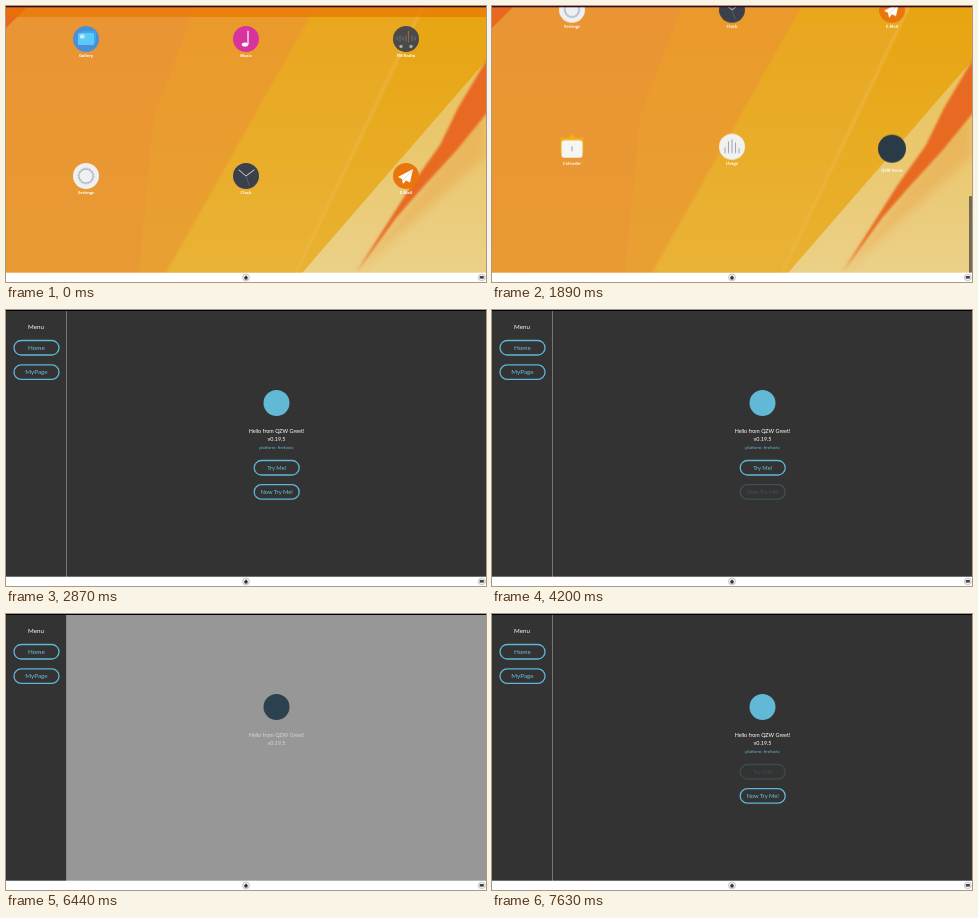
These frames come from a looping animation (480x276 px, 8 s). An HTML page:

```html
<!DOCTYPE html>
<html lang="en">
<head>
<meta charset="utf-8">
<title>TV launcher</title>
<style>
  html, body { margin: 0; width: 100%; height: 100%; overflow: hidden; background: #fff; }
  svg { display: block; width: 100vw; height: 100vh; }
  text { text-anchor: middle; font-family: Lato, sans-serif; }
  .label { font: bold 4px "Open Sans", sans-serif; fill: #fff; }
  .button rect { fill: none; stroke: #5fb6d5; stroke-width: 1.3; }
  .button text { fill: #69c3e0; font-size: 6.3px; }
  #dark .button text { font-size: 5.8px; }
  .line { fill: none; stroke-linecap: round; }
</style>
</head>
<body>
<svg viewBox="0 0 480 276">
  <defs>
    <clipPath id="screen"><rect width="480" height="267"/></clipPath>
    <filter id="soft" x="-20%" y="-20%" width="140%" height="140%"><feGaussianBlur stdDeviation="1"/></filter>
    <filter id="softer" x="-20%" y="-20%" width="140%" height="140%"><feGaussianBlur stdDeviation="5"/></filter>
    <linearGradient id="left" x1="0" y1="0" x2="0" y2="1">
      <stop offset="0" stop-color="#ea9433"/><stop offset="1" stop-color="#e99a34"/>
    </linearGradient>
    <linearGradient id="middle" x1="0" y1="0" x2="0" y2="1">
      <stop offset="0" stop-color="#ea9a2a"/><stop offset="1" stop-color="#e9a032"/>
    </linearGradient>
    <linearGradient id="gold" x1="0" y1="0" x2="0" y2="1">
      <stop offset="0" stop-color="#e9a61e"/><stop offset="1" stop-color="#e9b336"/>
    </linearGradient>
    <linearGradient id="right" x1="0" y1="0" x2="0" y2="1">
      <stop offset="0" stop-color="#e8a411"/><stop offset="1" stop-color="#e9b232"/>
    </linearGradient>
    <linearGradient id="pale" x1="0" y1="0" x2="0" y2="1">
      <stop offset="0" stop-color="#e9c25c"/><stop offset="1" stop-color="#ebd088"/>
    </linearGradient>
  </defs>

  <g clip-path="url(#screen)">
    <g id="wallpaper">
      <rect width="480" height="267" fill="url(#left)"/>
      <path d="M190 0H345L160 267H133L148 110Z" fill="url(#middle)"/>
      <path d="M310 0H480V267H160Z" fill="url(#gold)" filter="url(#soft)"/>
      <path d="M418 0H480V267H290Z" fill="url(#right)"/>
      <path d="M417 0L290 267" stroke="#ecb94a" stroke-width="3" opacity=".6" filter="url(#soft)"/>
      <path d="M480 55L458 80L296 267H480Z" fill="url(#pale)"/>
      <path d="M480 104L418 180L350 267L480 150Z" fill="#e9a850" opacity=".55" filter="url(#softer)"/>
      <path d="M490 38L452 102L434 139L405 180L350 267L390 212L418 180L450 145L490 96Z" fill="#e86a24" filter="url(#soft)"/>
      <path d="M0 0H22L0 22Z" fill="#e8681f"/>
    </g>
    <g id="content">
      <rect y="-267" width="480" height="267" fill="#e87200" opacity=".65"/>
      <rect y="422" width="480" height="267" fill="#e28c00" opacity=".75"/>
      <g transform="translate(80 22)">
        <circle r="13" fill="#4a90d6"/>
        <rect x="-5" y="-8" width="15" height="12" rx="1.5" fill="#3aa9e8"/>
        <rect x="-8" y="-6" width="16" height="12" rx="1.5" fill="#5cc9fa"/>
        <rect x="-6" y="-4.5" width="4.5" height="4" rx="1" fill="#c4ecfd"/>
        <text class="label" y="17.5">Gallery</text>
      </g>
      <g transform="translate(240 22)">
        <circle r="13" fill="#d7359d"/>
        <ellipse cx="-1" cy="5.5" rx="3.2" ry="2" fill="#fff"/>
        <path class="line" d="M2 5V-8" stroke="#fff" stroke-width="1.2"/>
        <text class="label" y="17.5">Music</text>
      </g>
      <g transform="translate(400 22)">
        <circle r="13" fill="#4b4a4a"/>
        <path class="line" d="M-9 -2V1M-6 -3V2M-3 -2V1M0 -3V2M6 -3V2M9 -2V1" stroke="#858585" stroke-width=".7"/>
        <path class="line" d="M2.5 -8V3" stroke="#c9623a" stroke-width=".8"/>
        <circle cx="-5" cy="7.5" r="1.7" fill="#aaa"/><circle cx="5" cy="7.5" r="1.7" fill="#aaa"/>
        <text class="label" y="17.5">FM Radio</text>
      </g>
      <g transform="translate(80 159)">
        <circle r="13" fill="#f0f0f0"/>
        <circle r="8" fill="none" stroke="#bcc4cf" stroke-width="1" stroke-dasharray="2 1.142"/>
        <circle r="7" fill="none" stroke="#b2bccb" stroke-width="1.3"/>
        <text class="label" y="17.5">Settings</text>
      </g>
      <g transform="translate(240 159)">
        <circle r="13" fill="#3a414c"/>
        <path class="line" d="M-7 -6L0 0L8 -6" stroke="#e6e8ea" stroke-width=".9"/>
        <path class="line" d="M0 0L3 9" stroke="#6c7582" stroke-width=".6"/>
        <text class="label" y="17.5">Clock</text>
      </g>
      <g transform="translate(400 159)">
        <circle r="13" fill="#e8760d"/>
        <path d="M7 -7L-8 1L-4 3L-3 8L0 4.5L4 6.5Z" fill="#fff"/>
        <path class="line" d="M-3 4L5 -4" stroke="#e8b080" stroke-width=".5"/>
        <text class="label" y="17.5">E-Mail</text>
      </g>
      <g transform="translate(80 296)">
        <path d="M-11.5 -9H-3L0 -12.5L3 -9H11.5V6H-11.5Z" fill="#efb010"/>
        <rect x="-10.5" y="-6.5" width="21" height="17.5" rx="3" fill="#f5f5f3"/>
        <path class="line" d="M0 0V4" stroke="#8b95a0" stroke-width=".9"/>
        <text class="label" y="17.5">Calendar</text>
      </g>
      <g transform="translate(240 296)">
        <circle r="13" fill="#f1f1f1"/>
        <path class="line" d="M-7 6V1M-3.5 6V-5M0 6V-7M3.5 6V-4M7 6V2" stroke="#a3a9b0" stroke-width="1.1"/>
        <text class="label" y="17.5">Usage</text>
      </g>
      <g transform="translate(400 298)">
        <circle r="14" fill="#293b47"/>
        <text class="label" y="22.7">QZW Greet</text>
      </g>
    </g>
    <rect id="scrollbar" x="477" width="3" height="77" rx="1" fill="#4c4a48" opacity="0"/>
    <rect width="480" height="1.3" fill="#300b22"/>

    <g id="app" opacity="0">
      <rect width="480" height="267" fill="#333"/>
      <g id="dark">
        <path d="M60.5 0V267" stroke="#777" stroke-width="1"/>
        <circle cx="270.5" cy="93" r="13" fill="#62b9d5"/>
        <g fill="#fff" font-size="5.4">
          <text x="270.5" y="122.8">Hello from QZW Greet!</text>
          <text x="270.5" y="130.8">v0.19.5</text>
        </g>
        <text x="270.5" y="139.2" font-size="4.4" fill="#62b9d5">platform: firefoxtv</text>
        <g id="first" class="button"></g>
        <g id="second" class="button"></g>
      </g>
      <g id="light" opacity="0">
        <rect x="60.5" width="420" height="267" fill="#979797"/>
        <circle cx="270.5" cy="93" r="13" fill="#2b414d"/>
        <g fill="#fff" font-size="5.4" opacity=".6">
          <text x="270.5" y="122.8">Hello from QZW Greet!</text>
          <text x="270.5" y="130.8">v0.19.5</text>
        </g>
      </g>
      <text x="30" y="18.8" font-size="6.2" fill="#fff">Menu</text>
      <g id="home" class="button"></g>
      <g id="page" class="button"></g>
      <rect width="480" height="1" fill="#000"/>
    </g>
  </g>

  <rect y="266.7" width="480" height="9.3" fill="#fff"/>
  <circle cx="240" cy="271.5" r="3.5" fill="#eee" stroke="#aaa" stroke-width=".6"/>
  <path d="M237.8 271.7L240 269.6L242.2 271.7H241.5V273.4H238.5V271.7Z" fill="#333"/>
  <rect x="472.3" y="268.2" width="7" height="6.6" rx="3.3" fill="#eee" stroke="#aaa" stroke-width=".6"/>
  <rect x="473.8" y="270" width="4" height="2.6" fill="#444"/>
</svg>
<script>
const LOOP = 8000, TICK = 70, SCROLL_MAX = 155, THUMB_TRAVEL = 190;
const $ = id => document.getElementById(id);

function addButton(id, x, y, caption) {
  $(id).innerHTML = `<rect x="${x}" y="${y}" width="45" height="14.5" rx="7.25"/>
    <text x="${x + 22.5}" y="${y + 9.4}">${caption}</text>`;
}
addButton('home', 8, 30.5, 'Home');
addButton('page', 8, 54.8, 'MyPage');
addButton('first', 248.2, 150.5, 'Try Me!');
addButton('second', 248.2, 174.7, 'Now Try Me!');

// Holds each value until the next step.
function play(id, property, steps) {
  const frames = steps.map(([time, value]) =>
    ({ offset: time / LOOP, [property]: value, easing: 'steps(1, end)' }));
  frames.push({ ...frames.at(-1), offset: 1 });
  $(id).animate(frames, { duration: LOOP, iterations: Infinity });
}

function glide(start, count, from, to) {
  return Array.from({ length: count }, (_, i) => {
    const left = 1 - (i + 1) / count;
    return [start + i * TICK, to + (from - to) * left ** 2];
  });
}

const scroll = [
  [0, 11],
  ...glide(70, 9, 11, 0),
  ...glide(1190, 6, 0, -166),
  ...glide(1610, 6, -166, -155),
  [2030, -154.5], [2100, -154], [2170, -153.5],
  [2310, -153], [2380, -152], [2730, -151], [2800, -150]
];
const thumbTop = y => THUMB_TRAVEL * Math.min(1, Math.max(0, -y / SCROLL_MAX));

play('content', 'transform', scroll.map(([t, y]) => [t, `translateY(${y}px)`]));
play('scrollbar', 'transform', scroll.map(([t, y]) => [t, `translateY(${thumbTop(y)}px)`]));
play('scrollbar', 'opacity', [[0, 0], [1190, 0.75]]);
play('app', 'opacity', [[0, 0], [2870, 1]]);
play('light', 'opacity', [[0, 0], [5180, 1], [6580, 0]]);
play('first', 'opacity', [[0, 1], [7630, 0.18]]);
play('second', 'opacity', [[0, 1], [3570, 0.18], [3850, 0.2], [4130, 0.22], [6580, 1]]);
</script>
</body>
</html>
```
